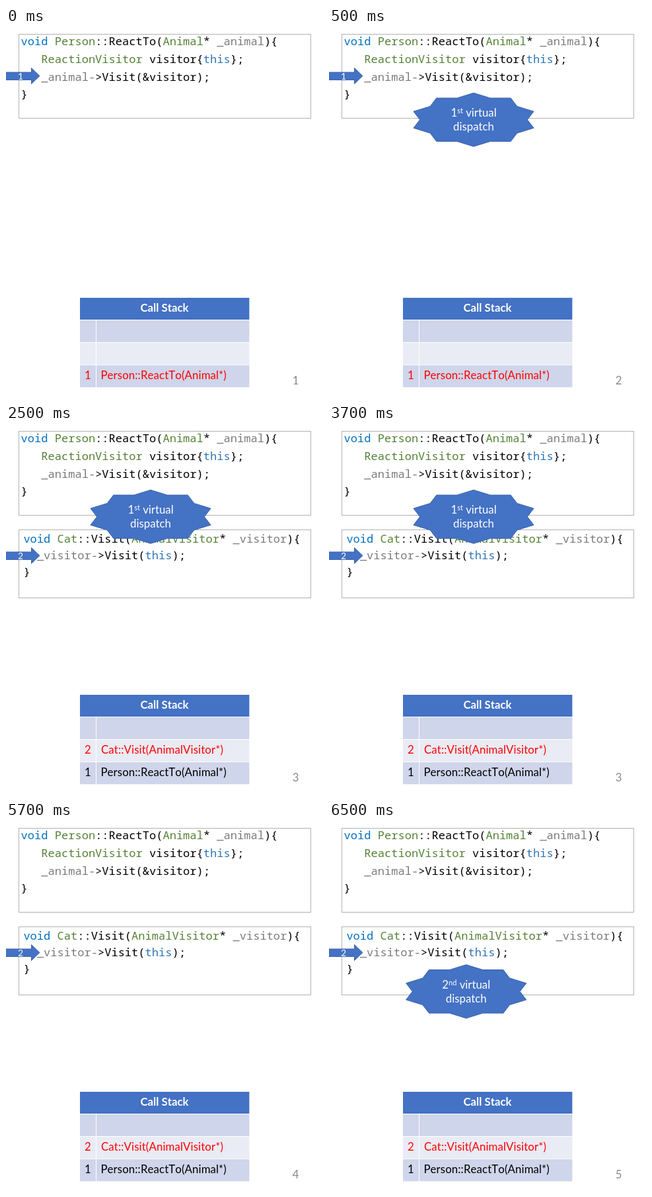
Write an HTML page that moves like this. It is 480x558 px and loops after 8000 ms.

```html
<!DOCTYPE html>
<html lang="en">
<head>
<meta charset="utf-8">
<title>Double dispatch call stack</title>
<style>
  html, body { margin: 0; width: 100%; height: 100%; overflow: hidden; background: #fff; }
  svg { display: block; width: 480px; height: 558px; font: 16.8px Lato, sans-serif; font-kerning: none; }
  .code text { font: 17.06px "Noto Sans Mono", monospace; font-variant-ligatures: none; white-space: pre; }
  .box { fill: #fff; stroke: #b2b2b2; }
  .key { fill: #0070c0; }
  .self { fill: #2e75b6; }
  .type { fill: #538135; }
  .arg { fill: #7a7a7a; }
  .shape { fill: #4472c4; stroke: #3a63ac; }
  .row { letter-spacing: .12px; }
  .mid { text-anchor: middle; }
  .white { fill: #fff; }
</style>
</head>
<body>
<svg viewBox="0 0 480 558">
  <g class="code">
    <rect class="box" x="19.5" y="9.5" width="442" height="127"/>
    <text x="22.6" y="26"><tspan class="key">void</tspan> <tspan class="type">Person</tspan>::ReactTo(<tspan class="type">Animal</tspan>* <tspan class="arg">_animal</tspan>){</text>
    <text x="53.3" y="53"><tspan class="type">ReactionVisitor</tspan> visitor{<tspan class="self">this</tspan>};</text>
    <text x="53.3" y="79.5"><tspan class="arg">_animal-</tspan>&gt;Visit(&amp;visitor);</text>
    <text x="22.6" y="106">}</text>
  </g>
  <g class="code" data-on="2 3 4">
    <rect class="box" x="19.5" y="158.5" width="442" height="103"/>
    <text x="26.4" y="177.5"><tspan class="key">void</tspan> <tspan class="type">Cat</tspan>::Visit(<tspan class="type">AnimalVisitor</tspan>* <tspan class="arg">_visitor</tspan>){</text>
    <text x="46.9" y="203"><tspan class="arg">_visitor-</tspan>&gt;Visit(<tspan class="self">this</tspan>);</text>
    <text x="26.4" y="228">}</text>
  </g>

  <g id="arrow">
    <path class="shape" d="M-1 67H38.5V60.5L51 72.5L38.5 84.5V78.5H-1Z"/>
    <text id="arrowNo" class="mid white" x="22" y="78.4" font-size="14"></text>
  </g>

  <g id="burst" data-on="1 2 4">
    <polygon id="star" class="shape"/>
    <text class="mid white" y="-4.7"><tspan id="ordinal"></tspan><tspan id="suffix" dy="-5" font-size="11"></tspan><tspan dy="5"> virtual</tspan></text>
    <text class="mid white" y="16.5">dispatch</text>
  </g>

  <rect x="112" y="408" width="256.4" height="33" fill="#4472c4"/>
  <text class="mid white" x="240" y="429" font-weight="700">Call Stack</text>
  <g fill="#cfd5ea">
    <path d="M112 442H136V475H112ZM137 442H368.4V475H137Z"/>
    <path fill="#e9ebf5" d="M112 476H136V509.3H112ZM137 476H368.4V509.3H137Z"/>
    <path d="M112 510H136V543.3H112ZM137 510H368.4V543.3H137Z"/>
  </g>
  <g class="row" fill="#f00" data-on="2 3 4">
    <text class="mid" x="124" y="497">2</text>
    <text x="144" y="497">Cat::Visit(AnimalVisitor*)</text>
  </g>
  <g class="row" id="caller">
    <text class="mid" x="124" y="531">1</text>
    <text x="143.4" y="531">Person::ReactTo(Animal*)</text>
  </g>
  <text id="page" x="443.5" y="538.7" text-anchor="end" fill="#898989"></text>
</svg>
<script>
const $ = id => document.getElementById(id);
const LOOP = 8000, STARTS = [0, 500, 2500, 4500, 6500];

// Ten-pointed star inside a 182 x 81 box
$('star').setAttribute('points', Array.from({ length: 20 }, (_, i) => {
  const a = i * Math.PI / 10, r = i % 2 ? 0.8507 : 1;
  return [95.7 * r * Math.sin(a), -40.5 * r * Math.cos(a)].map(v => v.toFixed(2));
}).join(' '));

function show(step) {
  const inCallee = step > 1, second = step > 3;
  for (const el of document.querySelectorAll('[data-on]'))
    el.style.display = el.dataset.on.includes(step) ? '' : 'none';
  $('arrow').setAttribute('transform', `translate(0 ${inCallee ? 125 : 0})`);
  $('arrowNo').textContent = inCallee ? 2 : 1;
  $('burst').setAttribute('transform', second ? 'translate(207.7 256.3)' : 'translate(219 138.7)');
  $('ordinal').textContent = second ? 2 : 1;
  $('suffix').textContent = second ? 'nd' : 'st';
  $('caller').setAttribute('fill', inCallee ? '#000' : '#f00');
  $('page').textContent = step + 1;
}

const start = performance.now();
let shown = -1;
function tick() {
  const t = (performance.now() - start) % LOOP;
  const step = STARTS.filter(s => s <= t).length - 1;
  if (step !== shown) show(shown = step);
  requestAnimationFrame(tick);
}
tick();
</script>
</body>
</html>
```
